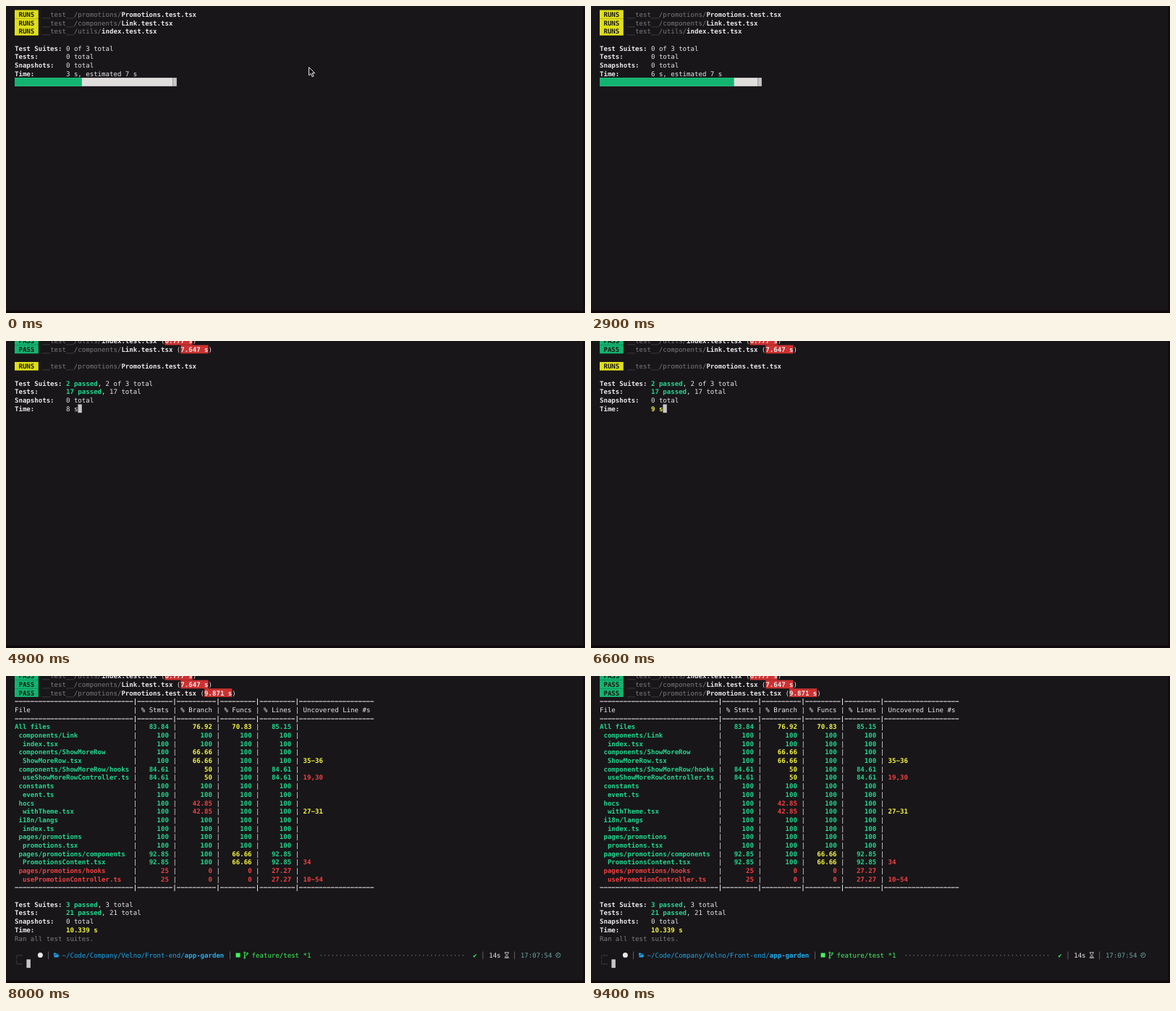
Animation of 800x424 px, one loop 9.5 s. Source, as an HTML page:

```html
<!DOCTYPE html>
<html lang="en">
<head>
<meta charset="utf-8">
<title>Test run</title>
<style>
  html, body { margin: 0; width: 100%; height: 100%; overflow: hidden; background: #181619; }
  svg { display: block; width: 800px; height: 424px; }
  text {
    font: 9.07px "DejaVu Sans Mono", "Liberation Mono", monospace;
    text-rendering: geometricPrecision;
    white-space: pre;
    fill: #e6e5e7;
  }
  .b { font-weight: bold; fill: #e8e7e9; }
  .dim { fill: #7b7a7d; }
  .faint { fill: #4a494c; }
  .ink { font-weight: bold; fill: #1a1a12; }
  .hi { font-weight: bold; fill: #23d88f; }
  .mid { font-weight: bold; fill: #f6f643; }
  .low { font-weight: bold; fill: #ee4242; }
  .path { fill: #1da6e8; }
  .dir { font-weight: bold; fill: #23aeee; }
  .git { fill: #40f45c; }
  .clock { fill: #6ba3a0; }
</style>
</head>
<body>
<svg viewBox="0 0 800 424">
  <rect width="800" height="424" fill="#181619"/>
  <g id="screen"></g>
  <rect x="797" width="3" height="424" fill="#0f0d11"/>
  <rect y="420.5" width="800" height="3.5" fill="#0f090c"/>
  <path id="pointer" d="M0 0V11.2L2.7 8.7L4.5 13L6.4 12.2L4.6 8.1H8Z"
        fill="#0a0a0a" stroke="#f2f2f2" stroke-width="1"/>
</svg>
<script>
const LOOP = 9500, LEFT = 12, CELL = 5.46, ROW = 11.69, MID = 11.45;
const GREEN = '#12b46f', YELLOW = '#dfdf18', RED = '#cd3131', GREY = '#c6c5c7';
const screen = document.getElementById('screen');
const pointer = document.getElementById('pointer');

const FILES = [
  ['promotions', 'Promotions.test.tsx', '9.871 s'],
  ['components', 'Link.test.tsx', '7.647 s'],
  ['utils', 'index.test.tsx', '6.777 s']
];
const PASSED_TESTS = [0, 5, 17];

// name, then % statements, branches, functions, lines, uncovered lines
const COVERAGE = [
  ['All files', 83.84, 76.92, 70.83, 85.15],
  [' components/Link'],
  ['  index.tsx'],
  [' components/ShowMoreRow', 100, 66.66],
  ['  ShowMoreRow.tsx', 100, 66.66, 100, 100, '35−36'],
  [' components/ShowMoreRow/hooks', 84.61, 50, 100, 84.61],
  ['  useShowMoreRowController.ts', 84.61, 50, 100, 84.61, '19,30'],
  [' constants'],
  ['  event.ts'],
  [' hocs', 100, 42.85],
  ['  withTheme.tsx', 100, 42.85, 100, 100, '27−31'],
  [' i18n/langs'],
  ['  index.ts'],
  [' pages/promotions'],
  ['  promotions.tsx'],
  [' pages/promotions/components', 92.85, 100, 66.66, 92.85],
  ['  PromotionsContent.tsx', 92.85, 100, 66.66, 92.85, '34'],
  [' pages/promotions/hooks', 25, 0, 0, 27.27],
  ['  usePromotionController.ts', 25, 0, 0, 27.27, '10−54']
];
const WIDTHS = [30, 9, 10, 9, 9, 19];
const HEADS = ['File', '% Stmts', '% Branch', '% Funcs', '% Lines', 'Uncovered Line #s'];

let out = '';
const colX = col => LEFT + col * CELL;
const rowY = row => MID + row * ROW;

function put(row, col, str, cls = '') {
  out += `<text class="${cls}" x="${colX(col).toFixed(2)}" y="${(rowY(row) + 3.4).toFixed(2)}">${str}</text>`;
  return col + str.length;
}

function block(row, col, cells, fill) {
  out += `<rect x="${colX(col).toFixed(2)}" y="${(rowY(row) - ROW / 2).toFixed(2)}"
    width="${(cells * CELL).toFixed(2)}" height="${ROW}" fill="${fill}"/>`;
}

const cursor = (row, col) => block(row, col, 1, GREY);

function fileLine(row, [dir, name, time], pass) {
  block(row, 0, 6, pass ? GREEN : YELLOW);
  put(row, 1, pass ? 'PASS' : 'RUNS', 'ink');
  let col = put(row, 7, `__test__/${dir}/`, 'dim');
  col = put(row, col, name, 'b');
  if (!pass) return;
  col = put(row, col, ' (');
  block(row, col, time.length, RED);
  put(row, put(row, col, time, 'b'), ')');
}

function summary(row, suites, tests, allDone) {
  ['Test Suites:', 'Tests:', 'Snapshots:', 'Time:'].forEach((s, i) => put(row + i, 0, s, 'b'));
  const count = (r, n, total) => {
    const col = n ? put(r, 13, `${n} passed`, 'hi') : 13;
    put(r, col, (n ? ', ' : '') + total);
  };
  count(row, suites, allDone ? '3 total' : `${suites} of 3 total`);
  count(row + 1, tests, `${tests} total`);
  put(row + 2, 13, '0 total');
}

function progress(row, sec) {
  if (sec >= 7) {
    cursor(row, put(row, 13, `${sec} s`, sec > 8 ? 'mid' : ''));
    return;
  }
  put(row, 13, `${sec} s, estimated 7 s`);
  const full = Math.floor(sec / 7 * 40);
  block(row + 1, 0, 40, '#e1dfde');
  block(row + 1, 0, full, GREEN);
  cursor(row + 1, 40);
}

function tableLine(row, cells, classes) {
  let col = 0;
  cells.forEach((cell, i) => {
    const number = i > 0 && i < 5;
    const pad = i === 0 ? 0 : number ? WIDTHS[i] - 1 - cell.length : 1;
    if (cell) put(row, col + pad, cell, classes[i]);
    col += WIDTHS[i];
    if (i < 5) put(row, col++, '|');
  });
}

const grade = n => n >= 80 ? 'hi' : n >= 50 ? 'mid' : 'low';

function table(top) {
  const rule = WIDTHS.map(w => '−'.repeat(w)).join('|');
  const drawRule = row => put(row, 0, rule, 'b');
  drawRule(top);
  tableLine(top + 1, HEADS, []);
  drawRule(top + 2);
  COVERAGE.forEach(([name, st = 100, br = 100, fn = 100, ln = 100, lines = ''], i) => {
    const nums = [st, br, fn, ln];
    const lineCls = ln === 100 ? 'mid' : 'low';
    tableLine(top + 3 + i, [name, ...nums.map(String), lines], [grade(st), ...nums.map(grade), lineCls]);
  });
  drawRule(top + 3 + COVERAGE.length);
}

function icon(row, col, body) {
  out += `<g transform="translate(${colX(col).toFixed(2)} ${rowY(row).toFixed(2)})">${body}</g>`;
}

function prompt(row) {
  put(row, 0, '╭─', 'faint');
  put(row + 1, 0, '╰─', 'faint');
  cursor(row + 1, 3);
  [8, 54, 118, 126].forEach(col => put(row, col, '│', 'dim'));
  icon(row, 6, '<circle cx="2.6" r="3.5" fill="#e8e8e8"/>');
  icon(row, 10, '<path d="M-.6-3H2L3-2H5.4V-1H1L-.6 2.4ZM1.4-.4H7L5.3 3H-.4Z" fill="#1da6e8"/>');
  put(row, put(row, 12, '~/Code/Company/Velno/Front-end/', 'path'), 'app-garden', 'dir');
  icon(row, 56, '<rect x="-.2" y="-3" width="6" height="6" fill="#40f45c"/>');
  icon(row, 58, `<g fill="none" stroke="#40f45c"><path d="M1-2.6V3M1 1.6C1 .2 4.8.8 4.8-1.6"/>
    <circle cx="1" cy="-3.4" r="1"/><circle cx="1" cy="3.6" r="1"/><circle cx="4.8" cy="-2.4" r="1"/></g>`);
  put(row, 60, 'feature/test *1', 'git');
  put(row, 77, '·'.repeat(37), 'dim');
  put(row, 116, '✔', 'git');
  put(row, 120, '14s');
  icon(row, 124, `<path d="M-.2-3.7H5.8M-.2 3.7H5.8M.7-3.5C.7-1 2.3-1 2.3 0S.7 1 .7 3.5M4.9-3.5C4.9-1 3.3-1 3.3 0S4.9 1 4.9 3.5M1.8 2.6H3.8"
    fill="none" stroke="#d4d3d5" stroke-width=".9"/>`);
  put(row, 128, '17:07:54', 'clock');
  icon(row, 137, `<g fill="none" stroke="#6ba3a0" stroke-width=".9"><circle cx="2.8" r="3.1"/>
    <path d="M2.8-1.8V.3H1.2"/></g>`);
}

const countPast = (t, marks) => marks.filter(m => t >= m).length;

function running(t) {
  const sec = 3 + countPast(t, [800, 1800, 2700, 3700, 4700, 5700, 6700]);
  const printed = countPast(t, [3900, 4800, 7000]);
  const reported = countPast(t, [4000, 4900]);
  for (let i = 0; i < printed; i++) fileLine(i - 1, FILES[2 - i], true);
  const active = FILES.slice(0, 3 - reported);
  active.forEach((f, i) => fileLine(printed + i, f, false));
  const row = printed + active.length + 1;
  summary(row, reported, PASSED_TESTS[reported], false);
  progress(row + 3, sec);
}

function finished(t) {
  for (let i = 0; i < 3; i++) fileLine(i - 1, FILES[2 - i], true);
  table(2);
  summary(26, 3, 21, true);
  put(29, 13, '10.339 s', 'mid');
  put(30, 0, 'Ran all test suites.', 'dim');
  if (t < 7300) cursor(31, 0);
  else prompt(32);
}

function draw(t) {
  out = '';
  (t < 7100 ? running : finished)(t);
  screen.innerHTML = out;
  pointer.setAttribute('transform', t < 100 ? 'translate(418.6 84.6)' : 'translate(775.5 24)');
  pointer.setAttribute('visibility', t < 200 ? 'visible' : 'hidden');
}

const start = performance.now();
let last = -1;
function tick() {
  const t = (performance.now() - start) % LOOP;
  const step = Math.floor(t / 100);
  if (step !== last) draw(step * 100);
  last = step;
  requestAnimationFrame(tick);
}
tick();
</script>
</body>
</html>
```
